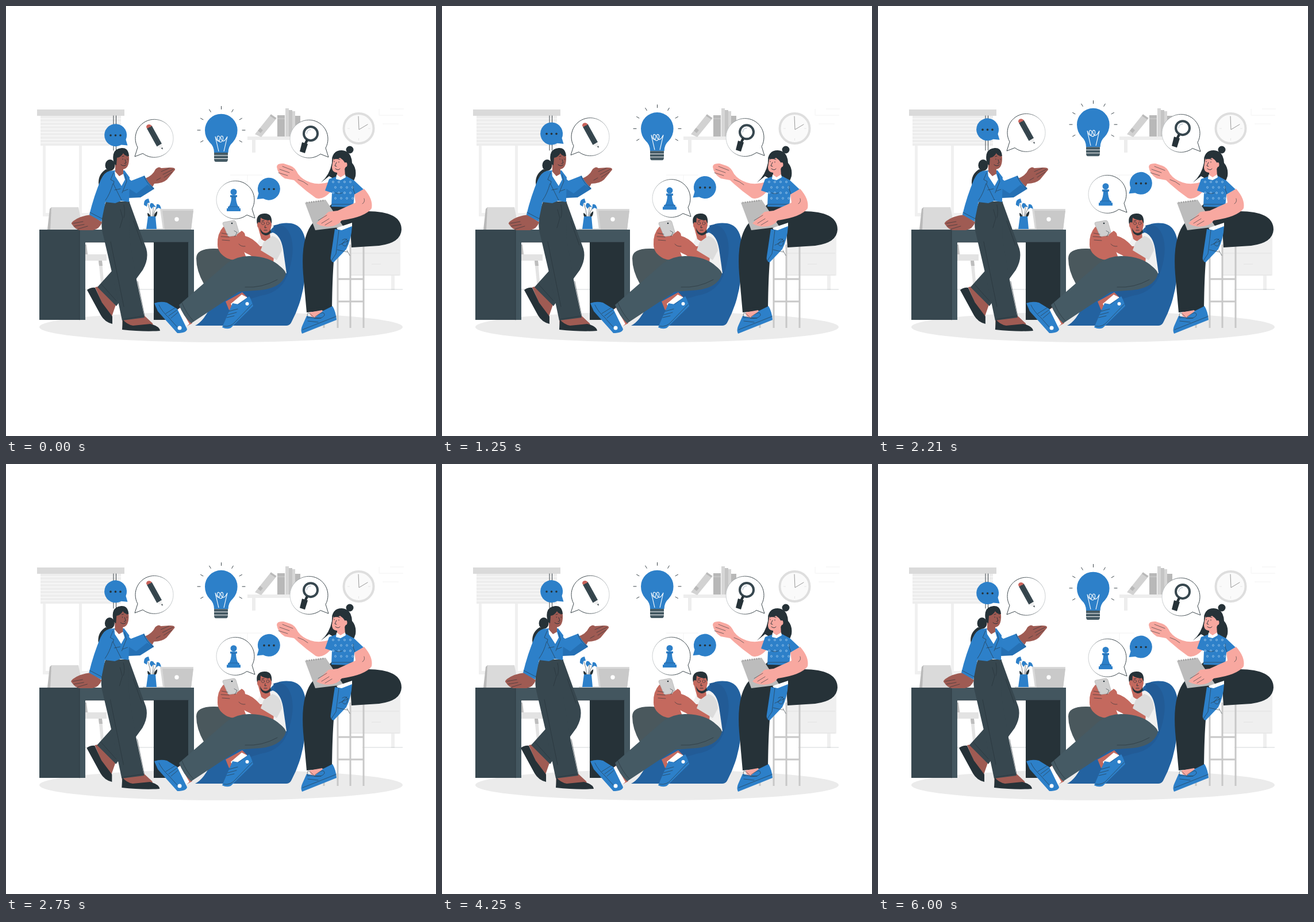
An HTML page that plays this animation: 748x748 px, repeating every 6040 ms.

```html
<!DOCTYPE html>
<html lang="en">
<head>
<meta charset="utf-8">
<title>Team ideas</title>
<style>
html,body{margin:0;width:100%;height:100%;overflow:hidden;background:#fff}
svg{display:block;width:100vw;height:100vh}
.ink{fill:none;stroke:#263238;stroke-width:.9;stroke-linecap:round;stroke-linejoin:round}
.fold{fill:none;stroke:#263238;stroke-width:.6;stroke-linecap:round}
.dark{fill:#263238}.blue{fill:#2d80c9}.slate{fill:#37474f}
.brown{fill:#9f5b53}.tan{fill:#c4695e}.pink{fill:#f8a8a0}.white{fill:#fff}
</style>
</head>
<body>
<svg viewBox="0 0 748 748">
<defs>
  <linearGradient id="rim" x1="1" x2="0">
    <stop offset=".35" stop-color="#263238"/>
    <stop offset="1" stop-color="#c9cdcf"/>
  </linearGradient>
</defs>
<ellipse cx="374" cy="558.500" rx="316" ry="26.500" fill="#ebebeb"/>

<g id="room">
  <path fill="#f0f0f0" d="M64 243h5v117h58V243h5v117h55v6H64z"/>
  <path fill="#dadada" d="M54 180h152v11H54z"/>
  <path fill="#ededed" d="M60 191h140v52H60z"/>
  <g id="slats" stroke="#fff"/>
  <path class="ink" d="M187 191v60M191.500 191v60"/>
  <path fill="#ededed" d="M420 227h80v6h-66v22h-6v-22h-8z"/>
  <path fill="#d2d2d2" d="M433 223l28-35 10 7-27 33z"/>
  <path fill="#b8b8b8" d="M438 217l5 4 4-5-5-4zM459 191l9 6 2-2-9-6zM472 190h13v37h-13zM503 191h9v36h-9z"/>
  <path fill="#d6d6d6" d="M486 178h6v49h-6zM498 183h5v44h-5z"/>
  <path fill="#c5c5c5" d="M492 181h6v46h-6zM472 195h13v2h-13z"/>
  <circle cx="613.500" cy="213" r="26" fill="#fafafa" stroke="#dedede" stroke-width="4"/>
  <path class="ink" style="stroke:#8d8d8d" d="M613 192l1 23 15-9"/>
  <path fill="none" stroke="#e6e6e6" d="M594 213h4M630 213h4M613.500 230v4"/>
  <path fill="none" stroke="#f2f2f2" d="M649 179v11h42M668 179h24M655 205h28M390 294h30v12h-30M420 294h26"/>
  <path fill="#efefef" d="M598 398h88v71h-10v25h-6v-25h-72z"/>
  <path fill="none" stroke="#e2e2e2" d="M600 430h84M600 468h84M636 414h16M636 449h16"/>
  <path fill="none" stroke="#b4babd" stroke-width=".6" d="M138 493h119M620 493h70"/>
  <path fill="#dadada" d="M79 350h47l8 39H75z"/>
  <path fill="#b9b9b9" d="M76 353l3-3-2 39h-5z"/>
  <path fill="#e3e3e3" d="M138 432h37v11h-8l4 48h-5l-5-48h-23z"/>
  <path fill="#bdbdbd" d="M132 415h8l2 17h-9zM161 443h6l1 9h-6z"/>
</g>

<g id="desk">
  <path class="slate" d="M58 389h71v157H58z"/>
  <path class="dark" d="M257 411h61v135h-61z"/>
  <path fill="#43565f" d="M128 389h199v157h-10V411H138v135h-10z"/>
  <path class="fold" d="M128 389v157M138 411h179"/>
  <path fill="#d8d8d8" d="M238 387h36v2h-36zM268 353h58l-4 36h-49z"/>
  <path fill="#c9c9c9" d="M272 356h54l-4 33h-46z"/>
  <circle cx="297" cy="371" r="3.700" class="white"/>
  <path class="fold" d="M252 367q-1-12-5-23M254 367q3-10 2-23M256 367q1-10 8-20"/>
  <path class="dark" d="M251 369q-5-1-5-9 6 2 5 9zM257 369q0-9 6-12 1 8-6 12z"/>
  <path class="blue" d="M247 366h13l2 22h-18zM240 346q-1-10 8-11l2 7-4 1-1 6zM250 348q1-8 6-4l5 6-5-1-3 4zM262 345q6-2 8 8l-5-2-4 3z"/>
</g>

<g id="standing">
  <path class="dark" d="M174 284q-13 8-13 23 1 12 7 18 0-13 6-20 6-11 6-19z"/>
  <ellipse cx="181" cy="277" rx="8.500" ry="10" class="dark"/>
  <path class="brown" d="M155 489l20-3 17 31-8 23-14-16zM202 541l39-2 14 13 2 8-54-3z"/>
  <path class="dark" d="M141 494q7-5 14-4l12 26 18 24 0 13q-13-3-20-15zM203 545q7 9 18 11l30-3q16 4 17 12-28 2-66-2z"/>
  <path class="slate" d="M191 342h24l29 80q5 18-6 37l-46 63-33-33 35-39z"/>
  <path class="slate" d="M174 340h41q-2 34 0 66l12 70 14 66-39 5-17-80-18-77q-3-25 7-50z"/>
  <path class="fold" d="M199 354l4 15-5 17M205 346q3 12 0 22M182 410l23 113M229 479l12 60-38 6M166 484l26 29M222 374l15 42"/>
  <path class="brown" d="M148 363q-19 2-31 11-5 4-2 6 5 8 13 10h23q12-2 16-14z"/>
  <path class="fold" d="M117 378l17-3M119 383l17-3M125 388l17-5"/>
  <path class="brown" d="M238 301q16-4 22-17 6-6 10-2l16-1q9 0 8 4l-14 17q-8 7-22 7l-6 11z"/>
  <path class="fold" d="M270 288l14-6M273 293l18-9M275 298l14-9M262 303l7-4"/>
  <path class="blue" d="M208 296l10 8 23-9q5 12 17 22l-24 15q-12 3-25-11z"/>
  <path fill="#2570b4" d="M213 317l14 9 19-15 12 7-24 15-21 1z"/>
  <path class="blue" d="M180 287l9-1h17l9 12-1 43-14-2-10 4-17-2-7 34-21-12q8-33 20-61 6-13 15-15z"/>
  <path class="brown" d="M190 275h14l0 19-6 6-8-9z"/>
  <path class="white" d="M189 287l8 9 7-4 3 10-6 11-11-17z"/>
  <path class="fold" d="M187 290l-5 12 6 3-1 5 14 28M207 293l3 12-8 20M186 309q-5 18-13 29M189 320l10-2M204 322l8-3M240 296q5 13 17 22M146 359l21 11"/>
  <path class="brown" d="M188 263q2-14 15-13 12 1 11 18-1 17-13 16-11-1-13-14z"/>
  <path class="dark" d="M187 270q-4-21 14-23 12-1 13 14-8 0-10-5-4 7-11 8l-1 13q-4-1-5-7z"/>
  <path class="ink" d="M203 266l.2 1M211 266l.2 1M207 267l2 6-3 1M200 276q5 4 9 0M202 262l3-1M210 261h2"/>
</g>

<g id="lounging">
  <path fill="#2362a0" d="M329 556q16-8 29-38l93-92 10-37q10-14 35-11 24 4 26 41 3 78-25 130-3 7-9 7z"/>
  <path fill="#225b96" d="M465 382q15-6 26 9 15 25 1 70-10 37-49 43l-23 7-9-12 74-38z"/>
  <path fill="#4a585d" d="M331 439q0-17 30-17 22-1 38 15l13 17-68 29q-13-23-13-44z"/>
  <path class="tan" d="M382 514l29-16 8 8-31 23z"/>
  <path class="white" d="M391 518l19-16 10 5-26 18z"/>
  <path class="blue" d="M394 517l11 2 18-14q4 6 7 17l-39 38q-7 3-15-1z"/>
  <circle cx="419.500" cy="518" r="3" class="white"/>
  <path class="fold" d="M388 531l15-4M386 537l15-4M384 542l13-3M379 557q12 2 20-8l29-30"/>
  <path fill="#f1f1f1" d="M443 402l21-8q14 5 18 29l6 42-45-9-7-42z"/>
  <path class="tan" d="M438 383l2-17h20l2 15-3 13 1 11q-8 8-16 0z"/>
  <path class="dark" d="M437 380q-4-18 12-19 15-1 13 18l-3-7q-11 1-16-4l-1 12z"/>
  <ellipse cx="440" cy="381" rx="3" ry="5" class="tan"/>
  <path class="dark" d="M442 386q3 9 10 9 6-1 8-7l1 5q-3 6-10 6-9-2-9-13z"/>
  <path class="ink" d="M445 374l4-1M454 373l4-1M449 390h5M451 382l-1 4 3-.500"/>
  <circle cx="447" cy="378" r="2.500" class="fold"/><circle cx="455.500" cy="378" r="2.500" class="fold"/>
  <path class="tan" d="M378 384q-11 12-10 31 0 15 17 24 16 7 33-1l-15-42z"/>
  <path fill="#cfcfcf" stroke="#9a9a9a" stroke-width=".5" d="M379 376l17-3q3 0 4 3l6 20q0 3-3 3l-14 2q-3 0-4-3l-8-19q0-3 2-3z"/>
  <circle cx="393" cy="378" r="1.300" class="dark"/>
  <path class="tan" d="M401 398l9-7q6 3 6 9 13 3 26 18l25-1-2 32q-23-2-41-16-20-8-23-24 5-3 0-11z"/>
  <path class="fold" d="M375 395l11 2M374 401l14 1M376 407l13 1M405 414q4 5 11 4M397 391l5 3-4 7"/>
  <path fill="#dcdcdc" d="M448 411l15-11q16 4 17 25l-9 17-28-17z"/>
  <path class="tan" d="M297 529l9-7 18 30-10 5z"/>
  <path class="white" d="M294 531l9-6 16 28-7 6z"/>
  <path fill="#455a64" d="M301 520l84-73q18-13 41-12 33 1 51 18 9 7 10 13-8 28-56 29l-26 2-83 55q-14-13-21-32z"/>
  <path class="fold" d="M306 516q7 18 20 32M416 489q29 2 56-13"/>
  <path class="blue" d="M258 517q11-4 22-1l18 11 17 35q-1 7-17 7l-34-38z"/>
  <path class="fold" d="M278 535l16-10M283 539l14-10M287 543l12-10M266 520q5 11 17 22l18 20"/>
  <circle cx="302" cy="560" r="3.500" class="white"/>
</g>

<g id="seated">
  <path fill="none" stroke="#c8c8c8" stroke-width="3" d="M577 415v145M599 415v145M622 415v145M576 475h47M576 514h47M553 535v25"/>
  <circle cx="598" cy="250" r="6.500" class="dark"/>
  <path class="dark" d="M567 273q-1-22 17-22 17 1 18 22 8 9 6 23-3 12-14 18l-32-18-14 11q15-13 19-34z"/>
  <path class="pink" d="M563 306q-18 6-33 1-15-5-22-15-6-12-13-14l-12-4q-12-1-12 6 2 13 14 20l16 3q18 17 38 31 12 4 25-10z"/>
  <path class="fold" d="M476 284l17 6M474 290l16 5M481 279l18 7M508 302q10 3 17 9"/>
  <path class="dark" d="M567 344l40 2 14 11q67-2 67 32-1 23-39 28l-48 3-2-31-21 5q-10 29-11 135l-44 4-6-67q-5-65 18-90z"/>
  <path class="blue" d="M562 301l14-5q7 6 14-1l15 8 17 16-16 9-2 22-38-1 1-24-12-4z"/>
  <path class="pink" d="M576 280h13l1 16q-7 7-14 1z"/>
  <path class="white" d="M575 293l-1 8 8 2 9-5-1-5-8 5z"/>
  <g id="dots" fill="none" stroke="#a9cfee" stroke-width=".8"/>
  <path class="fold" d="M573 325q6 3 12 0M607 327q-4-8-3-14M567 345h36"/>
  <path class="pink" d="M567 280l3-19h20l3 14-3 7q-8 11-18 7-5-2-5-9z"/>
  <path class="dark" d="M567 265q4-14 18-13 16 3 15 22l-8 14q2-16-11-24-4 4-14 1z"/>
  <ellipse cx="591" cy="276" rx="2.500" ry="4" class="pink"/>
  <path class="ink" d="M571 270v1M579 271v1M570 267l2-1M577 266l4 1M575 272l-3 6 3 1M573 283q5 4 8 0"/>
  <path fill="#bcbcbc" d="M520 342l36-5 31 47-49 6z"/>
  <path fill="none" stroke="#888" d="M523 342l31-4" stroke-dasharray="1 3" stroke-width="3"/>
  <path class="pink" d="M606 328l17-10q16 18 13 34-11 15-52 21-8 11-25 11-13-1-19-6l21-20 16-2 31-14z"/>
  <path class="fold" d="M543 373l15-9M549 378l13-8M555 381l12-7M623 335q2 6-3 9"/>
  <path class="white" d="M575 386l27-9v8l-23 7z"/>
  <path class="blue" d="M572 388l12 2 18-7q-1 22-10 40l-22 23q-7-2-5-11z"/>
  <path class="fold" d="M585 407q8-5 9 3-1 13-10 4l9-9M579 416l17-8M576 424l18 4M579 390l-5 41-8 12M593 425l5 9"/>
  <path class="pink" d="M528 533l22-4 2 9-21 5z"/>
  <path class="blue" d="M523 539l14 3 15-12 16-8q6 10 7 24l-60 24q-3-6 0-13z"/>
  <path class="fold" d="M516 563l58-23M526 542l22 1M525 548l18 2M535 541q-14-15-10 2M537 541q17-13 17-3-4 7-18 5M525 527l41-5"/>
</g>

<g id="floating">
  <g id="bulb">
    <path class="blue" d="M362 255q0-11-8-18-8-9-8-21a28.300 28.300 0 0 1 56.600 0q0 12-8 21-8 7-8 18z"/>
    <path fill="none" stroke="#fff" stroke-width="1.100" d="M364 227l6 26M385 227l-6 26M364 227q3 9 7 8 3-8-2-9-4 2 1 9 4 4 7-1 2-8-2-8-3 1 0 7 4 6 10-6"/>
    <path fill="#455a64" d="M362 255h24v4.500h-24zM362 260.500h24v4.500h-24zM362 266h24q0 5-3 5h-18q-3 0-3-5z"/>
    <g id="rays" class="ink"/>
  </g>
  <g class="talk" data-at="259 231" data-side="-1"/>
  <path class="slate" d="M245 213l8.500-5 17.500 31.500-8.500 5z"/>
  <path class="fold" d="M249 211l17.500 31"/>
  <path fill="#c9625a" d="M244 211q0-5 5-5 3 0 4.500 3l-8 4z"/>
  <path fill="#eee" d="M262.500 244.500l8.500-5 1.500 10z"/>
  <path class="dark" d="M270 247.500l2.500 2-.2-3.500z"/>
  <g class="talk" data-at="526 232" data-side="1"/>
  <circle cx="530" cy="222" r="12" fill="#fff" stroke="#37474f" stroke-width="4"/>
  <path class="ink" style="stroke:#9ab" d="M523 222q1-7 7-7"/>
  <path class="dark" d="M522 232l4 2-3 6-4-2zM515 237l10 3-5 16-9-3z"/>
  <g class="talk" data-at="398 338" data-side="1"/>
  <circle cx="396" cy="323.500" r="5.500" class="blue"/>
  <path class="blue" d="M390 329h12v3h-2q0 10 4 17h2v3h2v5h-24v-5h2v-3h2q4-7 4-17h-2z"/>
  <path fill="none" stroke="#205a90" stroke-width=".7" d="M390 332h12M387 349h18"/>
  <g class="chat" data-at="190.500 224.500" data-side="1"/>
  <g class="chat" data-at="457.500 318" data-side="-1"/>
</g>
</svg>
<script>
const LOOP = 6040, FRAME = LOOP / 145;
const $ = id => document.getElementById(id);
const range = n => [...Array(n).keys()];

$('slats').innerHTML = range(8).map(i => `<path d="M60 ${196 + i * 6}h140"/>`).join('');
$('dots').innerHTML = range(16).map(i => {
  const row = i >> 2, x = 569 + (i % 4) * 10 + (row % 2) * 4, y = 306 + row * 9.5;
  return `<circle cx="${x}" cy="${y}" r="1.5"/>`;
}).join('');
$('rays').innerHTML = range(9).map(i => {
  const a = (i - 4) * Math.PI / 6;
  const at = r => `${374.5 + r * Math.sin(a)} ${216 - r * Math.cos(a)}`;
  return `<path d="M${at(36.5)}L${at(41.5)}"/>`;
}).join('');

// Round balloons with a tail at the lower left or right
document.querySelectorAll('.talk, .chat').forEach(el => {
  const [x, y] = el.dataset.at.split(' ');
  const place = `transform="translate(${x} ${y}) scale(${el.dataset.side} 1)"`;
  el.innerHTML = el.classList.contains('talk')
    ? `<path ${place} fill="#fff" stroke="url(#rim)" stroke-width=".9" d="M21 25.5A33 33 0 1 1 30 15L35 31z"/>`
    : `<path ${place} class="blue" d="M10 17A19.5 19.5 0 1 1 18 8L21 18z"/>` +
      [-8.5, 0, 8.5].map(d => `<circle cx="${+x + d}" cy="${+y + .5}" r="1.8" class="dark"/>`).join('');
});

const sway = [0, -1, 2, -4, 4, -4, 4, -4, 2, -1, 0];
const ease = p => (1 - Math.cos(Math.PI * p)) / 2;

function draw(ms) {
  const t = Math.floor(ms % LOOP / FRAME + .2) * FRAME % LOOP;
  const lift = -10 * ease(t / LOOP * 8);
  const step = t / LOOP * 10, i = Math.floor(step);
  const dx = sway[i] + (sway[i + 1] - sway[i]) * ease(step - i);
  $('floating').setAttribute('transform', `translate(0 ${lift.toFixed(2)})`);
  $('standing').setAttribute('transform', `translate(${dx.toFixed(2)} 0)`);
}

const start = performance.now();
function tick() {
  draw(performance.now() - start);
  requestAnimationFrame(tick);
}
tick();
</script>
</body>
</html>
```
